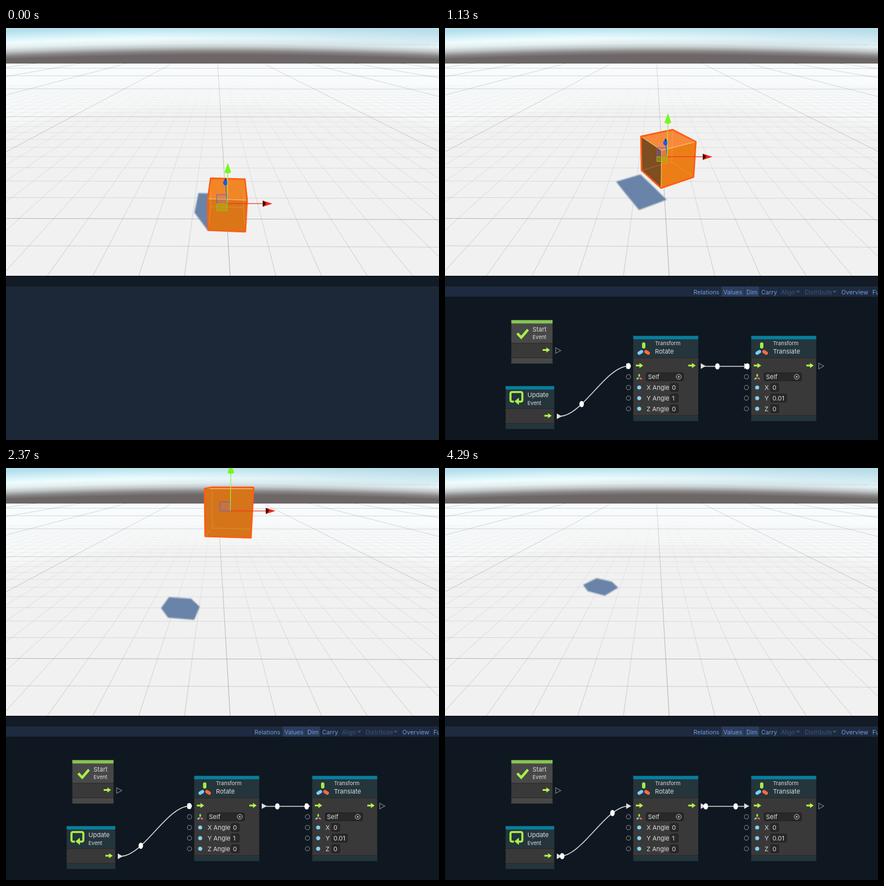
An HTML page with a canvas for the animation above (4360 ms loop, 767x730 px).

```html
<!DOCTYPE html>
<html lang="en">
<head>
<meta charset="utf-8">
<title>Rising cube</title>
<style>
html, body { margin: 0; width: 100%; height: 100%; overflow: hidden; background: #1c2838; }
canvas, svg { position: absolute; left: 0; top: 0; display: block; }
text { font-family: Inter, Roboto, sans-serif; font-size: 11px; fill: #dcdcdc; }
.small { font-size: 9.3px; }
.bar text { font-size: 10.7px; fill: #6f9cd8; }
.bar .off { fill: #3c5578; }
</style>
</head>
<body>
<canvas id="ground" width="767" height="439"></canvas>
<canvas id="scene" width="767" height="439"></canvas>
<svg id="panel" width="767" height="730" viewBox="0 0 767 730"></svg>
<script>
const LOOP = 4360, START = 304, STEP = 73.7;
const $ = id => document.getElementById(id);
const clamp = (v, a = 0, b = 1) => Math.min(b, Math.max(a, v));

// ---------- perspective ----------
function project([x, y, z]) {
  const w = z + 7.53 - 0.004 * x - 0.364 * y;
  return [372.6 + (463 * x + 139.8 + 2 * y) / w, 21.2 + (2389 - 492.7 * y) / w];
}

function trace(c, pts, close = true) {
  c.beginPath();
  pts.forEach(p => c.lineTo(p[0], p[1]));
  if (close) c.closePath();
}

function line(c, pts, color, width = 1) {
  trace(c, pts, false);
  c.strokeStyle = color;
  c.lineWidth = width;
  c.stroke();
}

function fill(c, pts, color) {
  trace(c, pts);
  c.fillStyle = color;
  c.fill();
}

// ---------- sky and ground ----------
function drawGround() {
  const c = $('ground').getContext('2d');
  const R = 9000;
  const sky = c.createRadialGradient(383, R, R - 70, 383, R, R + 2);
  [[0, '#6b6565'], [.31, '#6d6767'], [.4, '#898787'], [.5, '#c0c6c8'], [.6, '#e3eeef'],
   [.72, '#effcfd'], [.82, '#d9f4f9'], [1, '#b4dfec']].forEach(s => sky.addColorStop(...s));
  c.fillStyle = sky;
  c.fillRect(0, 0, 767, 63);
  const tint = c.createLinearGradient(250, 30, 620, 0);
  tint.addColorStop(0, 'rgba(190,218,230,0)');
  tint.addColorStop(1, 'rgba(190,218,230,.45)');
  c.fillStyle = tint;
  c.fillRect(0, 0, 767, 32);

  const floor = c.createRadialGradient(384, 1992, 1825, 384, 1992, 1935);
  floor.addColorStop(0, '#f1f1f1');
  floor.addColorStop(.24, '#f2f2f2');
  floor.addColorStop(.34, '#f6f8f8');
  floor.addColorStop(1, '#f9fcfd');
  c.fillStyle = floor;
  c.fillRect(0, 63, 767, 376);

  c.save();
  c.beginPath();
  c.rect(0, 63, 767, 376);
  c.clip();
  const fade = (far, near) => {
    const g = c.createLinearGradient(0, 63, 0, 439);
    g.addColorStop(0, `rgba(110,114,116,${far})`);
    g.addColorStop(1, `rgba(110,114,116,${near})`);
    return g;
  };
  const thin = fade(0, .42), bold = fade(.25, .55);
  for (let x = -60; x <= 60; x++) {
    const major = x % 10 === 0;
    line(c, [project([x, 0, -2.2]), project([x, 0, major ? 50 : 22])], major ? bold : thin, major ? 1 : .8);
  }
  for (let z = -1; z <= 40; z++) {
    const major = z % 10 === 0;
    if (z > 22 && !major) continue;
    line(c, [project([-50, 0, z]), project([50, 0, z])], major ? bold : thin, major ? 1 : .8);
  }
  c.restore();

  c.fillStyle = 'rgba(255,255,255,.55)';
  c.font = '11px Inter, sans-serif';
  c.fillText('P', 762, 35);
  line(c, [[760, 27], [751, 30.5], [760, 34]], 'rgba(255,255,255,.45)');
}

// ---------- cube ----------
// Step index and height; the cube turns one degree per hundredth of height.
const RISE = [[0, .06], [3, .44], [11, 1.49], [19, 2.52], [28, 3.68], [41, 5.32], [54, 6.58]];
const FACES = [[0, 1, 3, 2], [1, 5, 7, 3], [5, 4, 6, 7], [4, 0, 2, 6], [2, 3, 7, 6], [4, 5, 1, 0]];

function riseAt(k) {
  if (k < 0) return .03;
  let i = 1;
  while (i < RISE.length - 1 && k > RISE[i][0]) i++;
  const [k0, a] = RISE[i - 1], [k1, b] = RISE[i];
  return a + (b - a) * (k - k0) / (k1 - k0);
}

function hull(points) {
  const pts = [...points].sort((a, b) => a[0] - b[0] || a[1] - b[1]);
  const cross = (o, a, b) => (a[0] - o[0]) * (b[1] - o[1]) - (a[1] - o[1]) * (b[0] - o[0]);
  const half = list => {
    const out = [];
    for (const p of list) {
      while (out.length > 1 && cross(out.at(-2), out.at(-1), p) <= 0) out.pop();
      out.push(p);
    }
    return out.slice(0, -1);
  };
  return [...half(pts), ...half(pts.reverse())];
}

function area(p) {
  return p.reduce((s, a, i) => {
    const b = p[(i + 1) % p.length];
    return s + a[0] * b[1] - b[0] * a[1];
  }, 0);
}

function faceColor(i, turn, rise) {
  if (i === 4) return `rgb(${240 + 4 * rise},${134 + 2 * rise},${38 + 15 * rise})`;
  if (i === 5) return '#74451f';
  const a = turn - i * Math.PI / 2;
  const l = Math.max(0, -.321 * Math.sin(a) + .557 * Math.cos(a));
  return `rgb(${124 + 175 * l},${76 + 78 * l},${32 - 14 * l})`;
}

function drawGizmo(c, rise) {
  const [x, y] = project([0, .5 + rise, 0]);
  const level = 4.35 - rise, flat = level < 2.2;
  const tip = y - 72 - 3.4 * rise;

  c.fillStyle = 'rgba(130,110,255,.16)';
  c.fillRect(x - 18.5, y - 16, 18, 16);
  c.strokeStyle = '#6a58d8';
  c.lineWidth = 1;
  c.strokeRect(x - 18.5, y - 16, 18, 16);
  if (!flat) {
    const h = level * 2.9;
    c.fillStyle = 'rgba(150,190,10,.45)';
    c.fillRect(x - 18.5, y, 18.5, h);
    c.strokeStyle = '#a9b81c';
    c.strokeRect(x - 18.5, y, 18.5, h);
    const by = y - level * 8.6;
    line(c, [[x, y], [x - 3, by]], '#4a50e0', 1.2);
    fill(c, [[x - 6.5, by - 1], [x - 3, by - 8], [x + .5, by - 1]], '#101428');
    c.beginPath();
    c.ellipse(x - 3, by, 4.2, 4.8, 0, 0, 7);
    c.fillStyle = '#2850f4';
    c.fill();
  }
  line(c, [[x, y], [x + 1, tip + 17]], '#9cf03a', 1.3);
  fill(c, [[x - 5, tip + 17], [x + 1.2, tip], [x + 7, tip + 17], [x + 1, tip + 19]], '#74f81c');
  line(c, [[x, y], [x + 63, y]], '#fa3320', 1.2);
  fill(c, [[x + 63, y - 5.5], [x + 80, y], [x + 63, y + 5.5]], '#f42418');
  fill(c, [[x + 63, y - 5.5], [x + 69, y - 1], [x + 67, y + 2], [x + 63, y + 5.5]], '#28100c');
}

function drawScene(k) {
  const c = $('scene').getContext('2d');
  c.clearRect(0, 0, 767, 439);
  const rise = riseAt(k), turn = rise * 100 * Math.PI / 180;
  const s = Math.sin(turn), co = Math.cos(turn);
  const corners = Array.from({ length: 8 }, (_, i) => {
    const x = (i & 1) - .5, z = (i >> 2) - .5;
    return [x * co + z * s, (i >> 1 & 1) + rise, z * co - x * s];
  });

  const shade = corners.map(([x, y, z]) => project([x - .4195 * y, 0, z + .727 * y]));
  c.filter = 'blur(.8px)';
  fill(c, hull(shade), '#6a83a9');
  c.filter = 'none';

  const pts = corners.map(project);
  const faces = FACES.map((f, i) => ({ i, p: f.map(n => pts[n]) }));
  const front = faces.filter(f => area(f.p) < 0);
  c.lineJoin = 'round';
  front.forEach(f => fill(c, f.p, faceColor(f.i, turn, rise)));
  const edges = (list, color) => list.forEach(f => {
    trace(c, f.p);
    c.strokeStyle = color;
    c.lineWidth = .8;
    c.stroke();
  });
  edges(faces.filter(f => !front.includes(f)), 'rgba(255,205,130,.2)');
  edges(front, 'rgba(255,230,140,.55)');
  trace(c, hull(pts));
  c.strokeStyle = '#ff5c14';
  c.lineWidth = 2.8;
  c.stroke();
  drawGizmo(c, rise);
}

// ---------- node graph ----------
const rect = (x, y, w, h, color, more = '') =>
  `<rect x="${x}" y="${y}" width="${w}" height="${h}" fill="${color}" ${more}/>`;
const label = (x, y, str, cls = '') => `<text x="${x}" y="${y}" class="${cls}">${str}</text>`;
const use = (id, x, y, more = '') => `<use href="#${id}" transform="translate(${x} ${y}) ${more}"/>`;

function box(x, y, w, h, split, bar, tone) {
  return rect(x, y, w, h, '#393939') + rect(x, y, w, split, tone) +
    rect(x, y + h - 10, w, 10, tone) + rect(x, y, w, 6.5, bar) +
    rect(x, y + split, w, 1, '#222', 'opacity=".7"') + rect(x, y + h - 11, w, 1, '#222', 'opacity=".7"') +
    rect(x + .5, y + .5, w - 1, h - 1, 'none', 'stroke="#151b1f" stroke-opacity=".5"');
}

function field(x, y, w, str) {
  return rect(x, y - 7, w, 14, '#292929', 'rx="2" stroke="#1c1c1c"') + label(x + 3, y + 4, str);
}

function transformNode(x, title, rows, valueX) {
  const body = box(x, 545, 116, 152, 39, '#06809f', '#25353c') +
    use('axes', x + 19, 569) + label(x + 39, 562, 'Transform', 'small') + label(x + 39, 577, title) +
    use('arrow', x + 5, 598) + use('arrow', x + 98, 598) +
    use('axes', x + 11, 618.5, 'scale(.45)') + field(x + 23.5, 618, 66, 'Self') +
    `<circle cx="${x + 81}" cy="618" r="4.3" fill="none" stroke="#c4c4c4"/><circle cx="${x + 81}" cy="618" r="1.5" fill="#c4c4c4"/>` +
    rows.map(([name, value], i) => {
      const y = 637 + 18.8 * i;
      return `<circle cx="${x + 11}" cy="${y}" r="3.6" fill="#86d0f6"/>` + label(x + 24, y + 4, name) +
        field(x + valueX, y, value.length > 1 ? 28 : 14, value);
    }).join('');
  const ports = [618, 637, 655.8, 674.6].map(y =>
    `<circle cx="${x - 8}" cy="${y}" r="3.8" fill="none" stroke="#6c7074" stroke-width="1.3"/>`).join('');
  return { body, ports };
}

function buildPanel() {
  const turnNode = transformNode(333, 'Rotate', [['X Angle', '0'], ['Y Angle', '1'], ['Z Angle', '0']], 66);
  const moveNode = transformNode(542, 'Translate', [['X', '0'], ['Y', '0.01'], ['Z', '0']], 35);
  const tabs = [[440, 'Relations'], [493, 'Values'], [534, 'Dim'], [560, 'Carry'], [595, 'Align', 'off'],
    [637, 'Distribute', 'off'], [702, 'Overview'], [757, 'Full']];
  $('panel').innerHTML = `
    <defs>
      <path id="arrow" d="M0-1.6h6.5v-3l6.5 4.6-6.5 4.6v-3H0z" fill="#b0f54a"/>
      <path id="port" d="M0-5l9 5-9 5z"/>
      <g id="axes" stroke-width="6" stroke-linecap="round">
        <path d="M0-9v5" stroke="#a2ec46"/><path d="M-8 7l4-2.6" stroke="#7cccf5"/><path d="M8 7L4 4.4" stroke="#ff6a3c"/>
      </g>
    </defs>
    ${rect(0, 439, 767, 19, '#131b26')}${rect(0, 439, 767, 2, '#0e141c')}
    <g id="graph">
      ${rect(0, 458, 767, 272, '#0f1720')}
      <g class="bar">
        ${rect(0, 458, 767, 18, '#1e2a3f')}${rect(490, 458, 40, 18, '#2b3c5b')}${rect(531, 458, 25, 18, '#2b3c5b')}
        ${[437, 558, 591, 633, 698, 753].map(x => rect(x, 458, 1, 18, '#19243a')).join('')}
        ${tabs.map(([x, str, cls]) => label(x, 471.5, str, cls)).join('')}
        <path d="M622 465.5h7l-3.500 4zM686.500 465.500h7l-3.500 4z" fill="#3c5578"/>
      </g>
      <g id="nodes">
        ${box(117, 517, 74, 78, 41, '#86c652', '#484848')}
        <path d="M128 541l7 7.500 12-14" fill="none" stroke="#a8f04a" stroke-width="4.500"/>
        ${label(155, 537.5, 'Start')}${label(155, 551, 'Event', 'small')}${use('arrow', 173, 570.5)}
        ${box(107, 634, 87, 77, 40, '#06809f', '#25353c')}
        <path d="M122 662h-3q-3 0-3-3v-11q0-3 3-3h15q3 0 3 3v11q0 3-3 3h-5" fill="none" stroke="#a8f04a" stroke-width="3.600"/>
        <path d="M131 655v13l-8-6.500z" fill="#a8f04a"/>
        ${label(146, 654, 'Update')}${label(146, 667.5, 'Event', 'small')}${use('arrow', 176, 687)}
        ${turnNode.body}${moveNode.body}
      </g>
      ${turnNode.ports}${moveNode.ports}
      <g fill="none" stroke="#7c8084" stroke-width="1.200">${use('port', 196, 571.5)}${use('port', 662, 599)}</g>
      <path d="M203 688C243 688 285 599 325 599M458 599.500H535" fill="none" stroke="#dcdcdc" stroke-width="1.500"/>
      <g fill="#dcdcdc">${[[198, 688], [321, 599], [453, 599], [530, 599]].map(p => use('port', ...p)).join('')}</g>
      <g id="dots" fill="#fff">${'<ellipse rx="4" ry="5.5"/>'.repeat(4)}</g>
    </g>`;
}

// Times at which a pulse leaves each output; it travels for half a second.
const PULSES = [68, 630, 961, 1248, 1566, 1901, 2226, 2567, 2905, 3255, 3593, 3928, 4259];

function curve(t) {
  const u = 1 - t, a = u * u * u, b = 3 * u * u * t, d = 3 * u * t * t, e = t * t * t;
  return [203 * a + 243 * b + 285 * d + 325 * e, 688 * (a + b) + 599 * (d + e)];
}

function drawGraph(t, k) {
  $('graph').style.display = t < 80 ? 'none' : '';
  $('nodes').style.opacity = k < 0 ? .5 : clamp(.7 + k * .15);
  const now = START + 6 + k * STEP;
  const live = k < 0 ? [] : PULSES.map(p => (now - p) / 500).filter(p => p >= 0 && p <= 1);
  const spots = live.flatMap(p => [curve(clamp(1.1 * p - .03)), [457 + 80 * p, 599.5]]);
  [...$('dots').children].forEach((dot, i) => {
    const at = spots[i];
    dot.style.display = at ? '' : 'none';
    if (at) dot.setAttribute('transform', `translate(${at[0]} ${at[1]})`);
  });
}

// ---------- loop ----------
let shown = '';
const begin = performance.now();
function tick() {
  const t = (performance.now() - begin) % LOOP;
  const k = t < START ? -1 : Math.min(54, Math.floor((t - START) / STEP));
  const key = k + (t < 80 ? 'a' : 'b');
  if (key !== shown) {
    shown = key;
    drawScene(k);
    drawGraph(t, k);
  }
  requestAnimationFrame(tick);
}

drawGround();
buildPanel();
tick();
</script>
</body>
</html>
```
